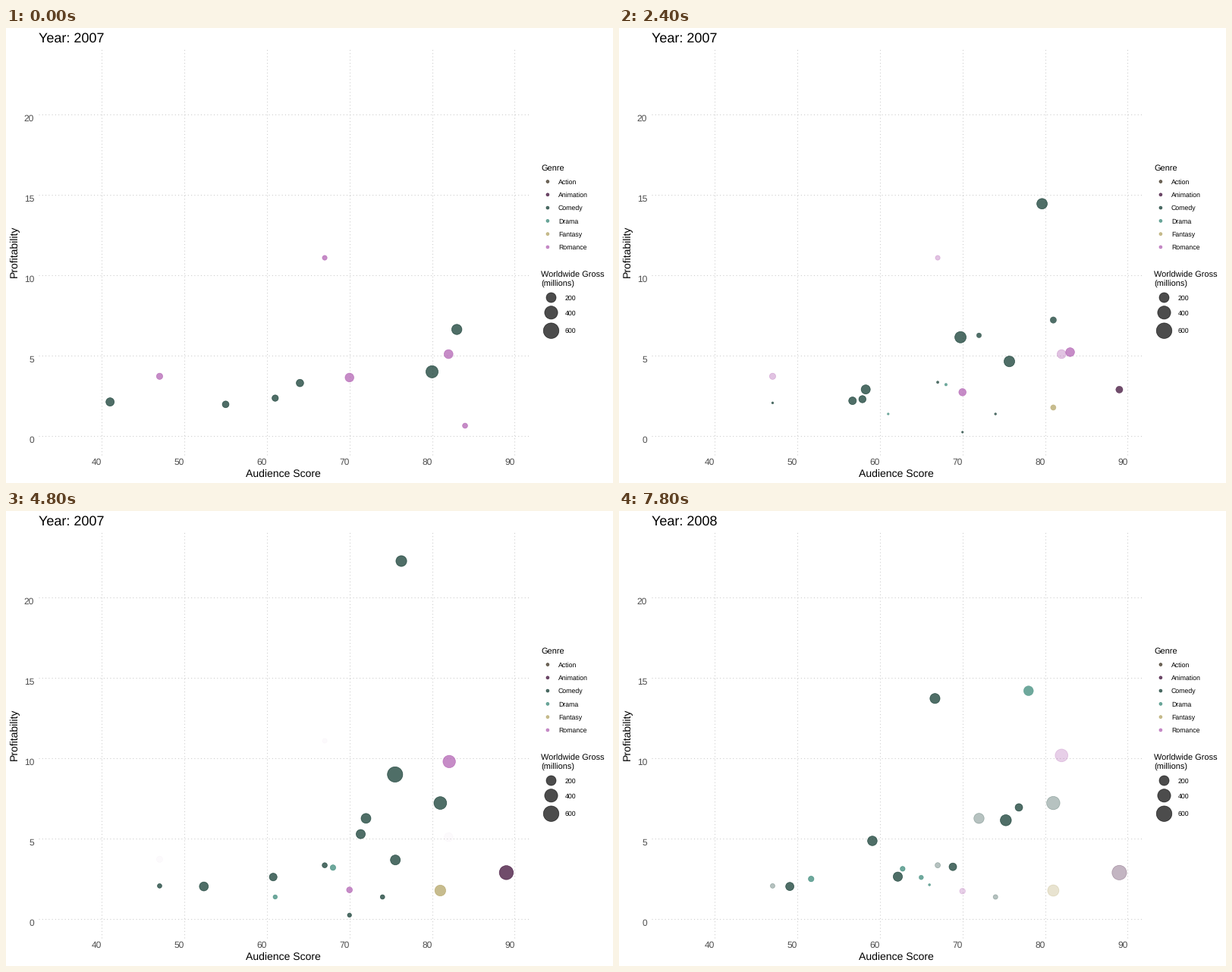
A matplotlib script for the animation above (8 s loop, 800x600 px).

```python
import matplotlib.pyplot as plt
from matplotlib.animation import FuncAnimation
from matplotlib.patches import Circle

W, H, DPI = 800, 600, 100
PX = 72 / DPI                 # points per pixel
FRAMES, STEP = 40, 200
KEYS = (0, 25, 49)            # frames on which a year is reached
YEARS = (2007, 2008, 2009)
ALPHA = 0.7
STROKE = 0.709
GROSS_MAX = 709.82

COLORS = {
    "Action": "#332716",
    "Animation": "#33002d",
    "Comedy": "#053026",
    "Drama": "#308372",
    "Fantasy": "#b0a05e",
    "Romance": "#af5bb0",
}

# One track per dot: (score, profitability, gross) for each year, None if absent
TRACKS = {
    "Romance": [
        [(67, 11.09, 22.2), None, None],
        [(47, 3.724, 55.9), None, None],
        [(82, 5.103, 153.1), None, None],
        [(70, 3.647, 145.9), (70, 1.747, 41.9), None],
        [(84, 0.653, 29.4), (82, 10.18, 376.7), None],
    ],
    "Fantasy": [[None, (81, 1.783, 285.4), None]],
    "Animation": [[None, (89, 2.896, 521.3), None]],
    "Drama": [
        [None, (68, 3.208, 43.3), (40, 2.004, 36.1)],
        [None, (61, 1.384, 16.6), (64, 4.383, 30.7)],
        [None, None, (65, 2.598, 101.3)],
        [None, None, (66, 2.14, 10.7)],
        [None, None, (78, 14.196, 709.8)],
    ],
    "Comedy": [
        [None, (47, 2.071, 20.7), None],
        [None, (67, 3.353, 33.5), None],
        [None, (74, 1.383, 20.7), None],
        [None, (72, 6.268, 219.4), None],
        [None, (81, 7.222, 415.3), None],
        [None, (70, 0.253, 15.2), (68, 5.403, 205.3)],
        [(41, 2.13, 127.8), (77, 3.747, 206.1), (74, 7.868, 314.7)],
        [(55, 1.98, 69.3), (61, 2.649, 106.0), (63, 2.642, 224.6)],
        [(61, 2.368, 59.2), (52, 2.023, 161.8), (47, 2.045, 102.2)],
        [(64, 3.307, 92.6), (76, 9.234, 609.5), (47, 1.751, 32.4)],
        [(80, 4.006, 340.5), (71, 5.344, 160.3), (81, 8.096, 60.7)],
        [(83, 6.636, 219.0), (76, 22.913, 252.0), (60, 7.154, 178.8)],
    ],
}


def px(score):
    return 126.3 + (score - 40) * 10.88


def py(profit):
    return 538.3 - profit * 21.215


def size_of(gross):
    return 1 + 9 * (gross / GROSS_MAX) ** 0.5


def radius_of(size):
    return (2.134 * size + STROKE) / 2


def mix(a, b, t):
    return a + (b - a) * t


def add_dot(x, y, size, color):
    dot = Circle((x, y), radius_of(size), facecolor=color, edgecolor=color,
                 linewidth=STROKE * PX, alpha=ALPHA, zorder=3)
    ax.add_patch(dot)
    return dot


def label(x, y, text, size, color="black", **kw):
    return ax.text(x, y, text, fontsize=size * PX, color=color,
                   va=kw.pop("va", "baseline"), **kw)


def grid_line(xs, ys):
    ax.plot(xs, ys, color="#cccccc", linewidth=1.067 * PX,
            linestyle=(0, (1, 3)), dash_capstyle="butt", zorder=1)


plt.rcParams["font.family"] = "Liberation Sans"
plt.rcParams["text.hinting"] = "no_hinting"

fig = plt.figure(figsize=(W / DPI, H / DPI), dpi=DPI, facecolor="white")
ax = fig.add_axes([0, 0, 1, 1])
ax.set_xlim(0, W)
ax.set_ylim(H, 0)
ax.axis("off")

# Panel
left, right, top, bottom = px(32.3), px(91.7), py(24.06), py(-1.146)
for value in range(0, 21, 5):
    grid_line([left, right], [py(value)] * 2)
    label(37.2, py(value) + 8.6, str(value), 12, "#4d4d4d", ha="right")
for value in range(40, 91, 10):
    grid_line([px(value)] * 2, [bottom, top])
    label(px(value), 576, str(value), 12, "#4d4d4d", ha="right")
title = label(left, 19, "", 18)
label((left + right) / 2, 592, "Audience Score", 14, ha="center")
label(16, (top + bottom) / 2, "Profitability", 14, ha="right", va="center",
      rotation=90, rotation_mode="default").set(ha="center", x=11.8)

# Legends
label(705, 188, "Genre", 11)
for i, (genre, color) in enumerate(COLORS.items()):
    y = 202.5 + 17.28 * i
    add_dot(713.9, y, 1.5, color)
    label(728, y + 3.2, genre, 8.8)
label(705, 329, "Worldwide Gross", 11)
label(705, 341, "(millions)", 11)
for gross, y in ((200, 355.5), (400, 375.3), (600, 399.2)):
    add_dot(718.5, y, size_of(gross), "black")
    label(737, y + 3.2, str(gross), 8.8)

dots = [(add_dot(0, 0, 1, COLORS[genre]), track)
        for genre, tracks in TRACKS.items() for track in tracks]


def place(dot, start, end, t):
    dot.set_visible(bool(start or (end and t > 0)))
    if not dot.get_visible():
        return
    a, b = start or end, end or start
    grow = 1 if start else t      # newcomers grow
    fade = 1 if end else 1 - t    # leavers fade
    dot.center = (px(mix(a[0], b[0], t)), py(mix(a[1], b[1], t)))
    size = mix(size_of(a[2]), size_of(b[2]), t)
    dot.set_radius(radius_of(size) * grow)
    dot.set_linewidth(STROKE * PX * grow)
    dot.set_alpha(ALPHA * fade)


def update(n):
    seg = 0 if n < KEYS[1] else 1
    t = (n - KEYS[seg]) / (KEYS[seg + 1] - KEYS[seg])
    title.set_text(f"Year: {YEARS[seg]}")
    for dot, track in dots:
        place(dot, track[seg], track[seg + 1], t)
    return [title] + [dot for dot, _ in dots]


anim = FuncAnimation(fig, update, frames=FRAMES, interval=STEP,
                     repeat=True, repeat_delay=0, blit=False)
plt.show()
```
